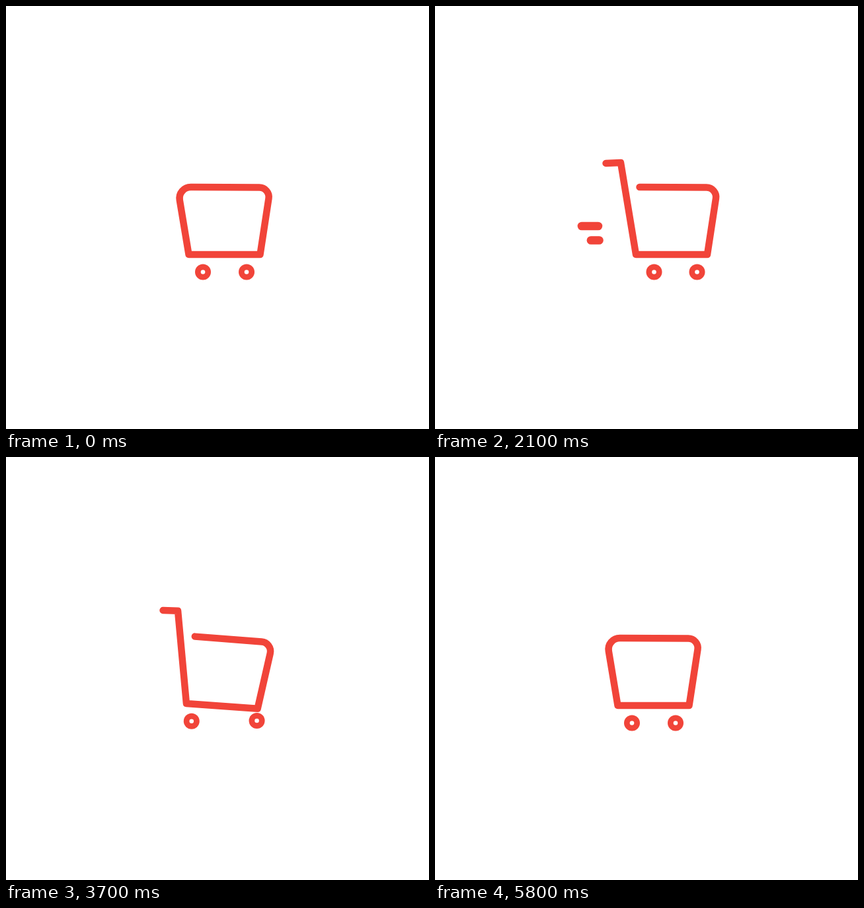
An HTML page with a canvas for the animation above (5.9 s loop, 640 by 640 pixels).

```html
<!DOCTYPE html>
<html lang="en">
<head>
<meta charset="utf-8">
<title>Cart and bag</title>
<style>
html, body { margin: 0; width: 100%; height: 100%; overflow: hidden; background: #fff; }
canvas { display: block; }
</style>
</head>
<body>
<canvas id="stage" width="640" height="640"></canvas>
<script>
const ctx = document.getElementById('stage').getContext('2d');
const RED = '#f14439', LOOP = 5900, STEP = 100;
const CX = 330.6, CY = 324.7;

const mix = (a, b, k) => a + (b - a) * k;
const mixPoint = (a, b, k) => [mix(a[0], b[0], k), mix(a[1], b[1], k)];
const span = (t, from, to) => Math.min(1, Math.max(0, (t - from) / (to - from)));
const bump = (t, from, to) => Math.sin(Math.PI * span(t, from, to));
const inOut = (u, n) => u < .5 ? (2 * u) ** n / 2 : 1 - (2 - 2 * u) ** n / 2;
const ramp = (t, from, to) => inOut(span(t, from, to), 2);

function bezier(a, b, c, d, k) {
  const ab = mixPoint(a, b, k), bc = mixPoint(b, c, k), cd = mixPoint(c, d, k);
  return mixPoint(mixPoint(ab, bc, k), mixPoint(bc, cd, k), k);
}

function disc(x, y, r, color) {
  ctx.fillStyle = color;
  ctx.beginPath();
  ctx.arc(x, y, r, 0, 2 * Math.PI);
  ctx.fill();
}

// The whole cart jumps once before it drives off
const hop = t => -22 * bump(t, 100, 1300);

const drive = t => ramp(t, 1300, 2100) - ramp(t, 2100, 2600)
                 + ramp(t, 2600, 3100) - ramp(t, 3100, 3500);

function basket(t) {
  const open = ramp(t, 0, 400) - ramp(t, 3700, 3950);
  const dip = 3.5 * bump(t, 1200, 1400) + bump(t, 3600, 3800);
  const turn = inOut(span(t, 3600, 4200), 2.8) + ramp(t, 5400, 5800);
  const grip = mixPoint([282, 274], [231, 238], open);
  const corner = mixPoint([259.5, 274], [253.5, 237], open);
  ctx.save();
  ctx.translate(CX + drive(t) * 27.5, CY + hop(t) + dip);
  ctx.rotate(turn * Math.PI);
  ctx.translate(-CX, -CY);
  ctx.lineWidth = 10.5;
  ctx.beginPath();
  ctx.moveTo(...grip);
  ctx.arcTo(...corner, 276.5, 376, 17 * (1 - open));
  ctx.lineTo(276.5, 376);
  ctx.lineTo(384.5, 376);
  ctx.arcTo(400, 274.7, 282, 274, 14.5);
  ctx.lineTo(282, 274);
  ctx.stroke();
  ctx.restore();
}

function speedLines(t) {
  if (t < 1300 || t >= 3500) return;
  const local = (t - 1300) % 1100;
  const head = ramp(local, 0, 700);
  const tail = span(local, 700, 1100) ** 1.6;
  ctx.lineWidth = 12.6;
  for (const [y, length] of [[333, 28], [354.5, 14]]) {
    ctx.beginPath();
    ctx.moveTo(250 - length * tail, y);
    ctx.lineTo(249.9 - length * head, y);
    ctx.stroke();
  }
}

function bagHandle(t) {
  const drawn = ramp(t, 4200, 4700) - span(t, 5400, 5700);
  if (drawn <= 0) return;
  ctx.lineCap = 'butt';
  ctx.lineWidth = 10.2;
  ctx.beginPath();
  ctx.ellipse(331.5, 306, 23.5, 30, 0, Math.PI, Math.PI * (1 - drawn), true);
  ctx.stroke();
  ctx.lineCap = 'round';
}

// side is -1 for the left wheel, 1 for the right one
function wheel(t, side) {
  const at = (x, dx, y, dy = 0) => [x + side * dx, y + side * dy];
  const base = at(331, 33, 402.5);
  const dot = at(331, 23.5, 301.3, -1.7);
  const knob = at(332, 24, 302, -3);
  let p;
  if (t < 3600) {
    const sway = -side * .5 * Math.cos(Math.PI * (t - 2100) / 1000);
    p = [base[0] + drive(t) * (33 + sway), base[1] + hop(t)];
  } else if (t < 4200) {
    p = bezier(base, at(326.5, 120.5, 392, -2), at(326.5, 120.5, 300), dot,
               inOut(span(t, 3600, 4200), 1.83));
  } else if (t < 5400) {
    p = mixPoint(dot, knob, span(t, 4800, 5400));
  } else {
    p = bezier(knob, at(334, 162, 150), at(334, 162, 400), base, span(t, 5400, 5800));
  }
  const scale = 1 - .61 * (ramp(t, 3900, 4200) - ramp(t, 4800, 5400));
  disc(...p, 12 * scale, RED);
  disc(...p, 3.3 * scale, '#fff');
}

function draw(t) {
  ctx.fillStyle = '#fff';
  ctx.fillRect(0, 0, 640, 640);
  ctx.strokeStyle = RED;
  ctx.lineCap = ctx.lineJoin = 'round';
  speedLines(t);
  basket(t);
  bagHandle(t);
  wheel(t, -1);
  wheel(t, 1);
}

const start = performance.now();
function tick() {
  const t = (performance.now() - start) % LOOP;
  draw(Math.floor(t / STEP) * STEP);
  requestAnimationFrame(tick);
}
tick();
</script>
</body>
</html>
```
